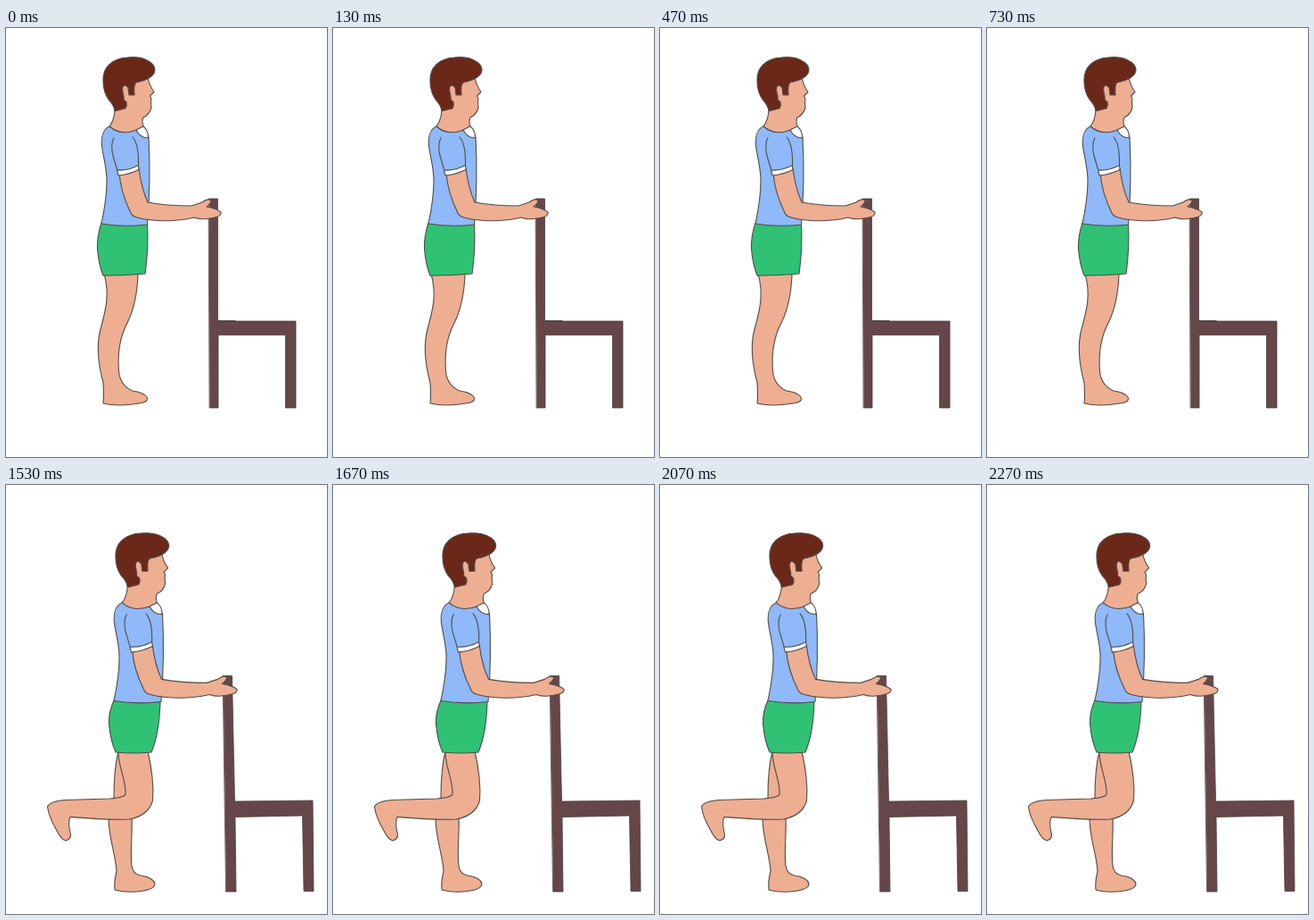
Animation, 360 px wide and 480 px high, one loop 3070 ms. Source, as an HTML page without scripts:

```html
<!DOCTYPE html>
<html lang="en">
<head>
<meta charset="utf-8">
<title>Standing leg curl</title>
<style>
html, body { margin: 0; width: 100%; height: 100%; overflow: hidden; background: #fff; }
svg { display: block; width: 100vw; height: 100vh; }
path { stroke: #504b48; stroke-width: 1.1; stroke-linejoin: round; stroke-linecap: round; vector-effect: non-scaling-stroke; }
.skin { fill: #eeae92; }
.hair { fill: #6b2818; }
.shirt { fill: #8fb9f9; }
.white { fill: #fff; }
.shorts { fill: #2fc274; }
.wood { fill: #65474a; stroke: #4c3c3e; stroke-width: .8; }
.line { fill: none; }
.stand { animation: stand 3070ms step-end infinite; }
.curl { visibility: hidden; animation: curl 3070ms step-end infinite; }
/* pose changes at 1530 ms */
@keyframes stand { 0% { visibility: visible } 49.837%, 100% { visibility: hidden } }
@keyframes curl { 0% { visibility: hidden } 49.837%, 100% { visibility: visible } }
</style>
</head>
<body>
<svg viewBox="0 0 360 480">
  <defs>
    <g id="body">
      <path class="skin" d="M122 92Q121 104 116 110Q127 124 148 115L154 110Q152 104 154 100Q161 97 163 89L162.500 83L163 79L161.500 76L166 71.500Q161 65 159 55L133 55Z"/>
      <path class="shirt" d="M116 110C109 113 106.500 122 107.500 132C109 144 113 156 113 171C113 190 110 205 107 219Q132 223 158.500 220Q162.500 170 160 122L147 114Q128 121 116 110Z"/>
      <path class="white" d="M146 114L154 110Q160 115 159.500 123Q150 123 146 114Z"/>
      <path class="hair" d="M122 93Q121 86 115 80Q109 71 109 60C108 44 119 34 136 33C153 31 167 38 167 47Q166 57 146 61Q143 63 144 75H138L137 67Q133 62 131 66C129 71 133 74 132 80L135 83Q136 87 134 90Z"/>
      <path class="skin" d="M127 162C128 176 132 191 140 207Q142 211 147 212C166 217 190 217 211 212Q219 215 228 213C237 212 242 210 241 206Q236 202 225 200Q230 196 230 193Q227 190 220 195Q214 197 208 199C194 199 175 198 159 195Q152 180 149 157Z"/>
      <path class="line" d="M121 123Q117 130 120 143L124.500 158M142 122Q149 130 148.500 153"/>
      <path class="white" d="M124.500 159Q137 160 148.500 153.500L149 158.500Q138 164 126 165Z"/>
    </g>
  </defs>

  <g class="stand">
    <path class="wood" d="M227.500 191H237.500V328H325V425H313.500V343.500H238V425H228.500Z"/>
    <path class="line" d="M238 327.500H257"/>
    <path class="skin" d="M110 275C117 300 111 318 106 337C100 359 105 382 109 397Q110 410 109 420Q126 424 149 420Q159 419 158.500 414Q156 408 142 406Q128 400 126.500 384C125 365 127 347 136 330Q147 308 148 275Z"/>
    <path class="shorts" d="M107 218Q102 233 102.500 247Q104 265 109 277Q133 277 156 275Q160 246 158.500 219Z"/>
    <use href="#body"/>
  </g>

  <g class="curl">
    <path class="wood" d="M243.500 213.500H253.500L256.500 354L344 353L345 454.500H334L332.500 370L257 371.500L258 455H247Z"/>
    <path class="skin" d="M126 298Q121 318 121 350L115 373C115 394 123 414 124 432Q121 444 122 453Q136 457 154 454Q167 452 167 446Q165 439 151 437Q142 435 141 426C139 410 142 390 141 372L140 298Z"/>
    <path class="skin" d="M126 299C126 316 135 331 134 346Q132 350 116 351L66 352.500Q49 354 46.500 360Q48 371 56 385Q62 397 67 398Q73 396 72.500 391C71 385 69 378 72 371.500C91 373 115 375 138 374Q160 370 164.500 353C166 334 163 315 159 298Z"/>
    <path class="shorts" d="M121 241Q115 254 115.500 267Q117 286 123 299Q143 301 163 299Q172 278 173 242Z"/>
    <use href="#body" transform="matrix(1.03 0 0 1.008 10.7 20.8)"/>
  </g>
</svg>
</body>
</html>
```
